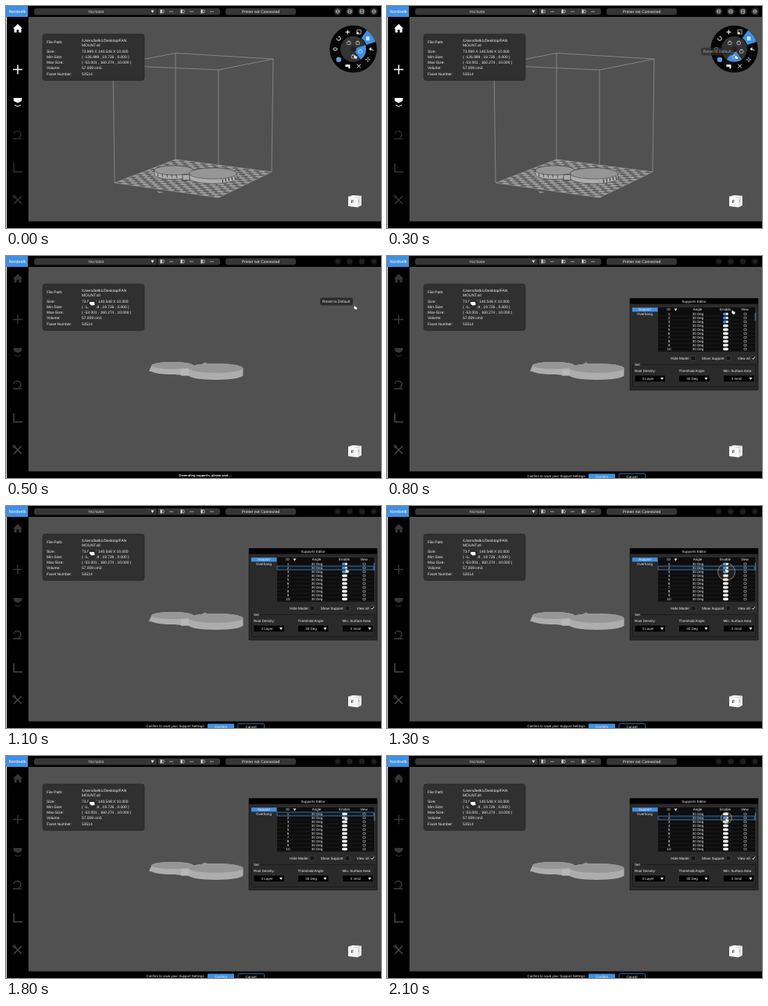
Animation of 480 by 285 pixels, one loop 2.2 s. Source, as an HTML page with a canvas:

```html
<!DOCTYPE html>
<html lang="en">
<head>
<meta charset="utf-8">
<title>Supports editor</title>
<style>
html, body { margin: 0; width: 100%; height: 100%; overflow: hidden; background: #000; }
canvas { display: block; width: 480px; height: 285px; }
</style>
</head>
<body>
<canvas id="stage"></canvas>
<script>
const LOOP = 2200, STEP = 100;
const HOVER = 100, TIP = 200, BUSY = 400, EDIT = 600;
const BLUE = '#4090e2', FONT = '"Liberation Sans", Arial, sans-serif';
const ROW_Y = 74.5, ROW_H = 5;

// Pointer key points
const path = [
  { at: 0, x: 446, y: 62 }, { at: 600, x: 446, y: 63 }, { at: 800, x: 442, y: 69 },
  { at: 1200, x: 434, y: 82 }, { at: 1500, x: 433, y: 73 }, { at: 2000, x: 434, y: 79 }
];
// Each click flips the switch of its row
const clicks = [{ at: 1300, row: 2 }, { at: 1400, row: 1 }, { at: 1500, row: 0 }, { at: 2000, row: 1 }];

const stage = document.getElementById('stage');
const ratio = Math.max(1, window.devicePixelRatio || 1);
stage.width = 480 * ratio;
stage.height = 285 * ratio;
const c = stage.getContext('2d');
c.scale(ratio, ratio);
c.textRendering = 'geometricPrecision';
c.textBaseline = 'middle';

const lerp = (a, b, k) => a + (b - a) * k;
const mix = (p, q, k) => [lerp(p[0], q[0], k), lerp(p[1], q[1], k)];
const rad = deg => deg * Math.PI / 180;

function paint(fill, stroke, width = 0.7) {
  if (fill) { c.fillStyle = fill; c.fill(); }
  if (stroke) { c.strokeStyle = stroke; c.lineWidth = width; c.stroke(); }
}
function box(x, y, w, h, fill, r = 0, stroke) {
  c.beginPath();
  c.roundRect(x, y, w, h, r);
  paint(fill, stroke);
}
function poly(points, ...style) {
  c.beginPath();
  points.forEach(([x, y]) => c.lineTo(x, y));
  c.closePath();
  paint(...style);
}
function line(color, width, ...points) {
  c.beginPath();
  points.forEach(([x, y]) => c.lineTo(x, y));
  paint(null, color, width);
}
function oval(x, y, rx, ry, ...style) {
  c.beginPath();
  c.ellipse(x, y, rx, ry, 0, 0, 7);
  paint(...style);
}
function arc(x, y, r, from, to, color, width) {
  c.beginPath();
  c.arc(x, y, r, rad(from), rad(to));
  paint(null, color, width);
}
function text(s, x, y, size = 4.5, align = 'center', color = '#f0f0f0', weight = 400) {
  c.font = `${weight} ${size}px ${FONT}`;
  c.textAlign = align;
  c.fillStyle = color;
  c.fillText(s, x, y);
}
const label = (s, x, y, size) => text(s, x, y, size, 'left');
const down = (x, y) => poly([[x - 2, y - 1.6], [x + 2, y - 1.6], [x, y + 1.8]], '#eee');
// Evenly turned strokes through one point: 2 from 0 is a plus, from 45 a cross
function star(x, y, r, color, width, turn = 0) {
  for (const a of [turn, turn + 90].map(rad)) {
    const dx = r * Math.cos(a), dy = r * Math.sin(a);
    line(color, width, [x - dx, y - dy], [x + dx, y + dy]);
  }
}

function topBar(busy) {
  box(0, 0, 480, 14, '#000');
  box(0, 0, 28, 14, BLUE);
  text('Nordvelk', 14.5, 7, 5.6, 'center', '#fff');
  box(36, 3, 238, 8.5, '#363636', 3);
  box(281, 3, 90, 8.5, '#363636', 3);
  line('#000', 0.8, [193.5, 3], [193.5, 11.5]);
  text('70174203', 115, 7.4);
  down(187.5, 7.2);
  for (let i = 0; i < 3; i++) {
    const x = 200 + 26 * i;
    box(x - 2.5, 4.5, 2, 5, '#ddd');
    oval(x + 1, 7, 1.4, 2, null, '#ccc');
    line('#ccc', 0.7, [x + 9, 7.2], [x + 14, 7.2]);
  }
  text('Printer not Connected', 326, 7.4, 5);
  const ink = busy ? '#3c3c3c' : '#ddd';
  for (let i = 0; i < 4; i++) {
    const x = 424.5 + 15.5 * i;
    oval(x, 7, 4.8, 4.8, busy ? '#0c0c0c' : '#2a2a2a');
    box(x - 2.2, 4.8, 4.4, 4.4, null, 2.2 - i % 3, ink);
    line(ink, 0.8, [x - 2, 7], [x + 2, 7]);
  }
}

function sideBar(busy) {
  box(0, 14, 28.5, 271, '#000');
  box(0, 14, 1, 271, '#e4e4e4');
  const main = busy ? '#363636' : '#fff', rest = busy ? '#484848' : '#333';
  poly([[9, 29], [15, 23], [21, 29]], main);
  box(10.5, 28.5, 9, 5.5, main);
  box(13.6, 30.5, 2.8, 3.5, '#000');
  star(15, 81.5, 6, main, 1.5);
  poly([[9.5, 118], [20.5, 118], [20, 122], [15, 124.5], [10, 122]], main);
  line(main, 1, [11, 127], [15, 129], [19, 127]);
  arc(14.5, 165, 4.5, 190, 430, rest, 1.2);
  line(rest, 1.2, [9, 170.5], [20, 170.5]);
  line(rest, 1.5, [10, 202], [10, 213], [21, 213]);
  star(15, 249, 7, rest, 1.5, 45);
  oval(10.5, 244.5, 1.8, 1.8, null, rest, 1);
}

function infoPanel(busy) {
  box(47, 36, 130, 59.5, '#303030', 3, '#282828');
  label('File Path:', 52, 47, 4.9);
  label('/Users/belk1/Desktop/FAN', 97, 44.2, 4.9);
  label('MOUNT.stl', 97, 51, 4.9);
  const facts = {
    'Size:': '73.999 X 140.548 X 10.000',
    'Min-Size:': '( -126.999 , 19.726 , 0.000 )',
    'Max-Size:': '( -53.001 , 160.274 , 10.000 )',
    'Volume:': '57.009 cm3',
    'Facet Number:': '53514'
  };
  Object.entries(facts).forEach(([name, value], i) => {
    const y = 58.2 + 7.25 * i;
    label(name, 52, y, 4.9);
    label(value, 97, y, 4.9);
  });
  if (!busy) return;
  oval(110.5, 62, 6.5, 6.8, '#2c2c2c');
  poly([[107, 59], [113, 59], [113.5, 63], [109.5, 63.5], [107, 61.5]], '#fff');
}

const floor = [[217, 197], [340, 213], [272, 246], [139, 227]];
const roof = [[217, 60.5], [342, 68], [272, 82], [137, 76]];

function platform() {
  const n = 18;
  const at = (u, v) => mix(mix(floor[0], floor[1], u / n), mix(floor[3], floor[2], u / n), v / n);
  poly(floor, '#606060');
  for (let u = 0; u < n; u++) for (let v = u % 2; v < n; v += 2)
    poly([at(u, v), at(u + 1, v), at(u + 1, v + 1), at(u, v + 1)], '#9c9c9c');
  poly([[193, 237.5], [202, 239], [196, 240.5]], '#8c8c8c');
}
function cage() {
  const ink = '#9a9a9a';
  poly(floor, null, ink);
  poly(roof, null, ink);
  floor.forEach((p, i) => line(ink, 0.7, p, roof[i]));
}
function disc(x, y, rx, ry, h, rim) {
  c.beginPath();
  c.ellipse(x, y, rx, ry, 0, Math.PI, 0);
  c.ellipse(x, y + h, rx, ry, 0, 0, Math.PI);
  c.closePath();
  paint('#adadad', rim, 0.6);
  oval(x, y, rx, ry, '#969696', rim, 0.6);
}
function modelOnBed() {
  const rim = '#444';
  disc(215, 211, 25, 6, 5.5, rim);
  disc(265, 215, 30.5, 7, 6, rim);
  for (let i = 0; i < 5; i++) {
    line('#333', 0.8, [194 + 6 * i, 215 + i * 0.4], [194.5 + 6 * i, 219 + i * 0.4]);
    line('#222', 1, [277 + 4 * i, 222.5 - i], [277.5 + 4 * i, 226.5 - i]);
  }
  box(226, 216.5, 9, 7, '#aaa', 0, '#333');
}
function modelOnly() {
  poly([[187, 139], [239, 139], [239, 150], [224, 153], [183, 148]], '#adadad');
  disc(213, 140.5, 26.5, 4.5, 7, null);
  poly([[250, 139], [255, 136.2], [259, 139]], '#8c8c8c');
  disc(268.5, 144, 35, 6, 9, null);
  box(224, 145.5, 10, 8.2, '#b8b8b8');
}

const HUB = { x: 444.5, y: 55.3 };
const around = (r, deg) => [HUB.x + r * Math.cos(rad(deg)), HUB.y + r * Math.sin(rad(deg))];

function wedge(r0, r1, mid, half) {
  c.beginPath();
  c.arc(HUB.x, HUB.y, r1, rad(mid - half), rad(mid + half));
  c.arc(HUB.x, HUB.y, r0, rad(mid + half), rad(mid - half), true);
  c.closePath();
  paint(BLUE);
}
// Tools of the outer ring, clockwise
const ink = '#eee';
const tools = [
  (x, y) => star(x, y, 2.8, ink, 1.1),
  (x, y) => { box(x - 2.6, y - 2.6, 5.2, 5.2, null, 0, ink); box(x - 2.6, y, 2.6, 2.6, ink); },
  (x, y) => box(x - 2.2, y - 2.5, 4.4, 5, '#d5e8ff'),
  (x, y) => { poly([[x - 3, y], [x, y - 2.5], [x, y + 2.5]], ink); line(ink, 1, [x, y], [x + 3, y + 2]); },
  (x, y) => { star(x, y, 3, ink, 0.9); oval(x, y, 0.9, 0.9, '#000'); },
  (x, y) => star(x, y, 3.4, ink, 1, 45),
  (x, y) => { box(x - 3, y - 2, 6, 3, ink); box(x + 1, y, 2, 3, ink); },
  (x, y) => box(x - 2.5, y - 2.5, 5, 5, '#4f9cec', 1, '#a5d0ff'),
  (x, y) => oval(x, y, 2.6, 1.5, null, ink, 1),
  (x, y) => arc(x, y, 2.5, -100, 190, ink, 1)
];
function wheel(picked) {
  oval(HUB.x, HUB.y, 30.3, 30.3, '#050505');
  wedge(17.5, 30, -36, 18);
  oval(HUB.x, HUB.y, 16.5, 16.5, '#333');
  wedge(4, 16.5, picked, 36);
  tools.forEach((tool, i) => tool(...around(23, i * 36 - 108)));
  for (let i = 0; i < 4; i++) {
    const [x, y] = around(9.7, i * 72 - 126);
    box(x - 2.2, y - 1.6, 4.4, 3.6, null, 0.8, '#ddd');
    line('#ddd', 0.7, [x - 1.5, y - 2.3], [x + 1.5, y - 2.3]);
  }
  oval(HUB.x, HUB.y, 3.5, 3.5, '#222');
}
function tip(busy) {
  box(402, 53.5, 42, 10, busy ? '#2c2c2c' : 'rgba(45,45,45,.7)', 3);
  text('Reset to Default', 404.8, 58.6, 5, 'left', busy ? '#ddd' : '#aaa');
}

function viewCube() {
  poly([[438, 244.5], [444, 243], [455, 243.7], [450, 245.5]], '#fff');
  poly([[438, 244.5], [450, 245.5], [450, 258.5], [438, 257]], '#f6f6f6');
  poly([[450, 245.5], [455, 243.7], [455, 256], [450, 258.5]], '#e6e6e6');
  text('F', 443.5, 251.3, 5.6, 'center', '#333', 700);
  text('I', 451.8, 251, 5, 'center', '#777');
}

function toggle(y, on) {
  box(430, y - 1.8, 7, 3.6, on ? BLUE : '#f5f5f5', 1.8);
  if (on) oval(435.4, y, 1.4, 1.4, '#fff');
}
function check(name, x, right) {
  text(name, right, 131.4, 4.6, 'right');
  box(x, 128.3, 6, 6, '#161616', 0, '#4a4a4a');
}
function drop(name, value, x) {
  label(name, x, 148);
  box(x, 153, 39.5, 8.7, '#000', 1, '#3a3a3a');
  text(value, x + 17, 157.5);
  down(x + 35, 157.5);
}
function editor(hovered, isOn) {
  box(311, 54.5, 164, 117.5, '#2a2a2a', 0, '#111');
  box(311, 54.5, 164, 7, '#000');
  text('Supports Editor', 393, 58.3);
  box(314, 66.3, 32.5, 5.2, BLUE);
  text('Support', 330, 69.1);
  text('Overhang', 330, 74.4);
  box(347, 66, 124, 57, '#0d0d0d');
  text('ID', 360.5, 69.1);
  down(369.5, 69);
  text('Angle', 397.5, 69.1);
  text('Enable', 433, 69.1);
  text('View', 458, 69.1);
  for (let i = 0; i < 10; i++) {
    const y = ROW_Y + i * ROW_H;
    line('#333', 0.4, [347, y + 2.5], [470, y + 2.5]);
    text(i + 1, 361, y);
    text('30 Deg', 398, y);
    toggle(y, isOn(i));
    oval(458.5, y, 2, 1.2, null, '#bbb');
  }
  if (hovered >= 0) box(347, ROW_Y - 2.4 + hovered * ROW_H, 123.3, 4.8, 'rgba(64,144,226,.1)', 0, '#4a88c8');
  box(470.7, 73, 1.6, 10, '#41688f');
  check('Hide Model', 389, 386.5);
  check('Show Support', 434, 431.5);
  check('View all', 466, 464.5);
  line('#fff', 0.9, [467.3, 131], [468.6, 132.8], [471, 129.3]);
  box(314.5, 139.5, 157.5, 28.5, null, 1, '#161616');
  box(316, 137, 9, 5, '#2a2a2a');
  label('Set', 317, 139.8);
  drop('Root Density:', '3 Layer', 317);
  drop('Threshold Angle:', '30 Deg', 373.5);
  drop('Min. Surface Area:', '3 mm2', 430.5);
}
function confirmBar() {
  label('Confirm to save your Support Settings', 179.5, 283, 4.4);
  box(258, 279.6, 34, 8, BLUE, 1);
  text('Confirm', 275, 283.4);
  box(297, 279.6, 33.5, 8, '#000', 1, BLUE);
  text('Cancel', 313.5, 283.4);
}

function pointerAt(t) {
  const i = path.findLastIndex(p => p.at <= t);
  const a = path[i], b = path[i + 1] || a;
  const k = a === b ? 0 : (t - a.at) / (b.at - a.at);
  return mix([a.x, a.y], [b.x, b.y], k * k * (3 - 2 * k));
}
function pointer(x, y) {
  poly([[x, y], [x + 1.4, y + 2], [x + 4, y + 3], [x + 3, y + 6], [x + 0.8, y + 6], [x - 1.2, y + 3.6]], '#fff', '#222', 0.5);
}
function ring(t) {
  const click = clicks.findLast(k => k.at <= t);
  const age = click ? t - click.at : LOOP;
  if (age >= 200) return;
  const r = 11 - age / 25;
  oval(434.5, ROW_Y + click.row * ROW_H, r, r, 'rgba(200,180,150,.1)', 'rgba(210,190,160,.65)', 0.9);
}

function draw(t) {
  const busy = t >= BUSY;
  const [x, y] = pointerAt(t);
  box(0, 0, 480, 285, '#000');
  box(28.5, 14, 451.5, 262.5, '#515151');
  if (busy) modelOnly();
  else { platform(); modelOnBed(); cage(); }
  topBar(busy);
  sideBar(busy);
  infoPanel(busy);
  viewCube();
  if (!busy) wheel(t < HOVER ? 18 : 90);
  if (t >= TIP && t < EDIT) tip(busy);
  if (t >= EDIT) {
    const hovered = Math.max(-1, Math.floor((y - ROW_Y + ROW_H / 2) / ROW_H));
    const flips = row => clicks.filter(k => k.row === row && k.at < t).length;
    editor(hovered, row => row < 3 && flips(row) % 2 === 0);
    confirmBar();
    ring(t);
  } else if (busy) {
    text('Generating supports, please wait ...', 255, 282.2, 4, 'center', '#fff', 700);
  }
  pointer(x, y);
}

const start = performance.now();
let shown = -1;
function tick() {
  const now = (performance.now() - start) % LOOP;
  const t = now - now % STEP;
  if (t !== shown) draw(shown = t);
  requestAnimationFrame(tick);
}
tick();
</script>
</body>
</html>
```
